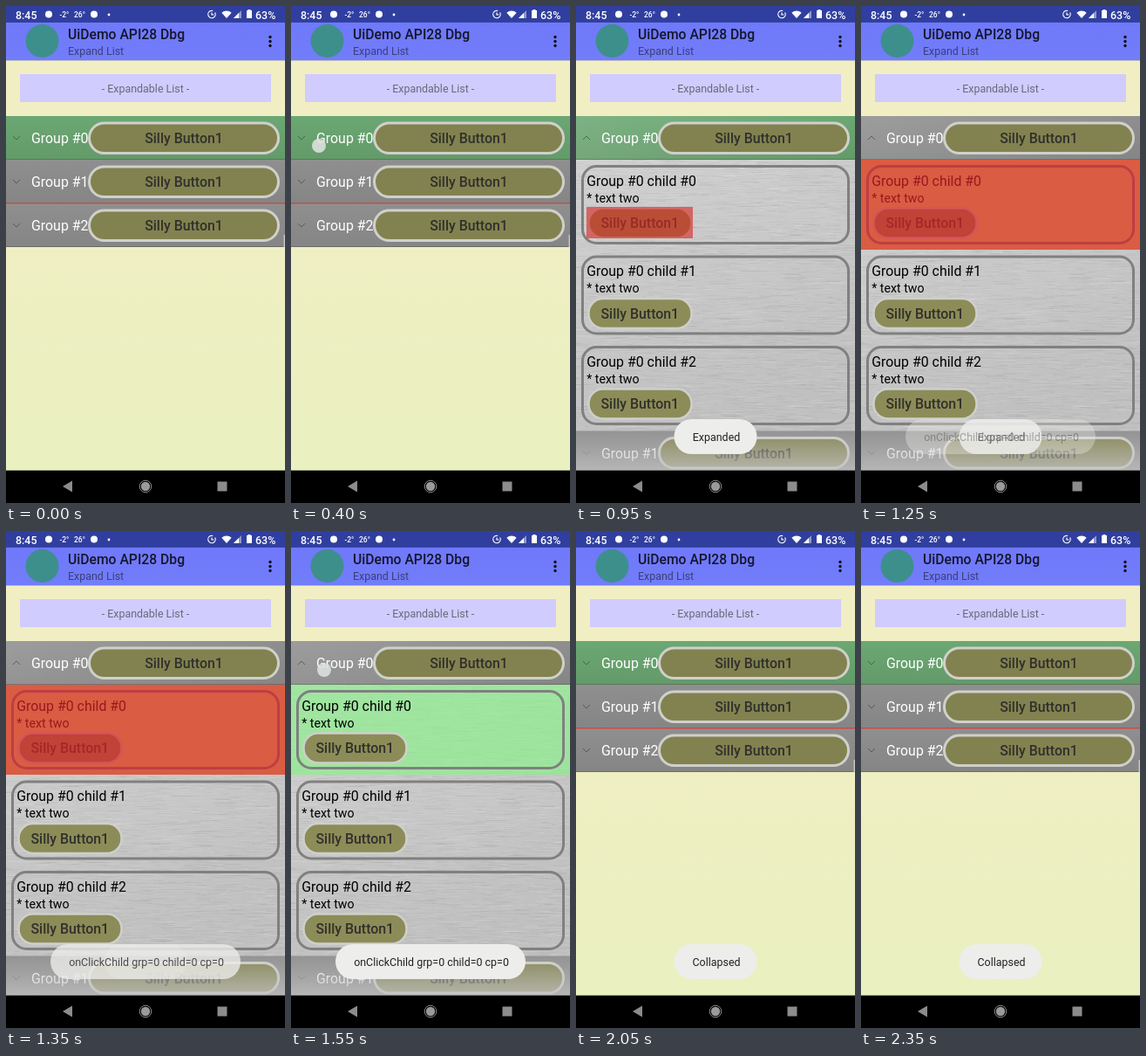
An HTML page with a canvas that plays this animation: 320 by 569 pixels, repeating every 2400 ms.

```html
<!DOCTYPE html>
<html lang="en">
<head>
<meta charset="utf-8">
<title>Expandable list</title>
<style>
html, body { margin: 0; width: 100%; height: 100%; overflow: hidden; background: #000; }
canvas { display: block; width: 320px; height: 569px; }
</style>
</head>
<body>
<canvas id="stage" width="320" height="569"></canvas>
<script>
const ctx = document.getElementById('stage').getContext('2d');
const LOOP = 2400;
const LIST_FONT = 15.9;
const SMALL_FONT = 12.45;

const clamp = v => Math.max(0, Math.min(1, v));
const ramp = (t, from, to) => clamp((t - from) / (to - from));
const pulse = (t, a, b, c, d) => ramp(t, a, b) * (1 - ramp(t, c, d));
const between = (t, a, b) => t >= a && t < b;

function rect(x, y, w, h, fill) {
  ctx.fillStyle = fill;
  ctx.fillRect(x, y, w, h);
}

function shade(x, y, w, h, from, to, sideways = false) {
  const g = ctx.createLinearGradient(x, y, sideways ? x + w : x, sideways ? y : y + h);
  g.addColorStop(0, from);
  g.addColorStop(1, to);
  rect(x, y, w, h, g);
}

function pill(x, y, w, h, r, fill, stroke, line) {
  ctx.beginPath();
  ctx.roundRect(x, y, w, h, r);
  if (fill) { ctx.fillStyle = fill; ctx.fill(); }
  if (stroke) { ctx.strokeStyle = stroke; ctx.lineWidth = line; ctx.stroke(); }
}

function disc(x, y, r, fill) {
  ctx.beginPath();
  ctx.arc(x, y, r, 0, Math.PI * 2);
  ctx.fillStyle = fill;
  ctx.fill();
}

function polygon(fill, ...pts) {
  ctx.beginPath();
  for (let i = 0; i < pts.length; i += 2) ctx.lineTo(pts[i], pts[i + 1]);
  ctx.closePath();
  ctx.fillStyle = fill;
  ctx.fill();
}

function text(str, x, y, size, color, weight = 400, align = 'left') {
  ctx.font = `${weight} ${size}px Roboto, sans-serif`;
  ctx.textAlign = align;
  ctx.fillStyle = color;
  ctx.fillText(str, x, y);
}

// Brushed metal: faint short streaks from a seeded generator
function makeMetal() {
  const tile = document.createElement('canvas');
  tile.width = 320;
  tile.height = 311;
  const c = tile.getContext('2d');
  let seed = 7;
  const random = () => (seed = seed * 16807 % 2147483647) / 2147483647;
  const base = c.createLinearGradient(0, 0, 120, 311);
  base.addColorStop(0, '#d0d0d0');
  base.addColorStop(1, '#c0c0c0');
  c.fillStyle = base;
  c.fillRect(0, 0, 320, 311);
  for (let i = 0; i < 3500; i++) {
    c.fillStyle = random() < 0.5 ? 'rgba(255,255,255,.07)' : 'rgba(90,90,90,.05)';
    c.fillRect(random() * 340 - 20, Math.floor(random() * 311), 4 + random() * 22, 1);
  }
  return tile;
}
const metal = makeMetal();

function statusBar() {
  rect(0, 0, 320, 18.7, '#303f9f');
  text('8:45', 11, 14.5, SMALL_FONT, '#fff', 500);
  disc(49, 9.5, 4, '#fff');
  text('-2°', 61.5, 12.5, 8.5, '#fff', 500);
  text('26°', 78, 12.5, 8.5, '#fff', 500);
  disc(101, 9.5, 4, '#fff');
  disc(118, 10, 1.4, '#fff');
  ctx.strokeStyle = '#fff';
  ctx.lineWidth = 1.2;
  ctx.beginPath();
  ctx.arc(236, 9.5, 4.2, -0.5, 5);
  ctx.moveTo(236, 7.5);
  ctx.lineTo(236, 10);
  ctx.lineTo(238.5, 10);
  ctx.stroke();
  ctx.beginPath();
  ctx.moveTo(253, 14);
  ctx.arc(253, 14, 8.5, -2.3, -0.84);
  ctx.fillStyle = '#fff';
  ctx.fill();
  polygon('#8f98cc', 261, 14, 270, 14, 270, 5);
  polygon('#fff', 261, 14, 267, 14, 267, 8);
  rect(276, 5, 6, 9, '#fff');
  rect(277.5, 4, 3, 1, '#fff');
  text('63%', 286, 14.5, SMALL_FONT, '#fff', 500);
}

function header() {
  rect(0, 62, 320, 1, 'rgba(0,0,0,.12)');
  shade(0, 18.7, 320, 43.5, '#6f79f9', '#727dfb');
  disc(41.5, 40, 19, '#3d8f8c');
  text('UiDemo API28 Dbg', 71, 38, 15.7, '#15162c', 500);
  text('Expand List', 71, 56, SMALL_FONT, '#3b3f77');
  for (const y of [35.5, 40.5, 45.5]) disc(303, y, 1.7, '#111');
}

function navBar() {
  rect(0, 531.7, 320, 38, '#000');
  polygon('#8c8c8c', 65, 550, 76, 543.5, 76, 556.5);
  disc(160, 550, 5.2, '#9a9a9a');
  ctx.beginPath();
  ctx.arc(160, 550, 6.8, 0, Math.PI * 2);
  ctx.strokeStyle = '#8c8c8c';
  ctx.lineWidth = 1;
  ctx.stroke();
  rect(242.5, 544.5, 11, 11, '#8c8c8c');
}

function groupRow(index, y, green, open) {
  if (green) shade(0, y, 320, 50, '#6ba873', '#639a69');
  else shade(0, y, 320, 50, '#8f8f8f', '#858585');
  if (open) shade(0, y, 320, 50, 'rgba(255,255,255,.12)', 'rgba(255,255,255,0)', true);
  rect(0, y + 49, 320, 1, 'rgba(70,70,70,.4)');
  const dir = open ? -1 : 1;
  ctx.beginPath();
  ctx.moveTo(8, y + 25 - 2 * dir);
  ctx.lineTo(12, y + 25 + 2 * dir);
  ctx.lineTo(16, y + 25 - 2 * dir);
  ctx.strokeStyle = 'rgba(50,60,50,.6)';
  ctx.lineWidth = 1;
  ctx.stroke();
  text('Group #' + index, 29, y + 31, LIST_FONT, '#fff');
  pill(95.5, y + 8, 217, 34.5, 17.2, '#828250', '#d0d0cb', 3);
  text('Silly Button1', 204, y + 31, LIST_FONT, '#30302c', 500, 'center');
}

function childRow(index, y) {
  pill(7.5, y + 7.5, 305, 88, 16, null, '#808080', 3);
  text('Group #0 child #' + index, 12.2, y + 29.5, LIST_FONT, '#000');
  text('* text two', 12.2, y + 48.5, 14.2, '#000');
  pill(14.5, y + 55.5, 118, 34, 16.5, '#8c8c58', '#cfcfcb', 2.5);
  text('Silly Button1', 73.3, y + 78, LIST_FONT, '#30302c', 500, 'center');
}

function expandedList(t) {
  const pressed = between(t, 1050, 1400);
  ctx.drawImage(metal, 0, 176);
  if (pressed) rect(0, 176, 320, 103, '#e1e682');
  if (t >= 1400) rect(0, 176, 320, 103, 'rgba(135,243,135,.65)');
  for (let i = 0; i < 3; i++) childRow(i, 176 + i * 103.5);
  if (between(t, 900, 1050)) rect(12, 230, 122, 36, 'rgba(215,40,35,.62)');
  if (pressed) rect(0, 176, 320, 103, 'rgba(215,35,40,.7)');
  groupRow(0, 126, t < 1050, true);
  groupRow(1, 486.5, false, false);
  shade(0, 487, 320, 45, 'rgba(195,195,195,.1)', 'rgba(195,195,195,.8)');
}

function collapsedList() {
  for (let i = 0; i < 3; i++) groupRow(i, 126 + i * 50, i === 0, false);
  rect(0, 225.5, 320, 1, '#f04038');
  rect(318.5, 262, 1.5, 14, '#c4c4c4');
}

function toast(str, width, alpha) {
  if (!alpha) return;
  ctx.globalAlpha = alpha;
  pill(160 - width / 2, 473, width, 40, 20, '#ededeb');
  text(str, 161, 498, SMALL_FONT, '#222', 400, 'center');
  ctx.globalAlpha = 1;
}

function touch(x, y, alpha) {
  ctx.globalAlpha = alpha;
  disc(x, y, 8, 'rgba(222,226,222,.88)');
  ctx.globalAlpha = 1;
}

function draw(t) {
  shade(0, 62, 320, 470, '#f2eec4', '#eaf0c0');
  rect(16, 78, 288, 32, '#d0ccfd');
  text('- Expandable List -', 160, 99, SMALL_FONT, '#69697c', 400, 'center');
  if (between(t, 500, 1700)) expandedList(t);
  else collapsedList();
  touch(32, 160, pulse(t, 300, 350, 450, 500));
  touch(38, 159, pulse(t, 1450, 1500, 1600, 1700));
  toast('Expanded', 95, pulse(t, 550, 750, 1220, 1400));
  toast('onClickChild grp=0 child=0 cp=0', 218, pulse(t, 1170, 1400, 1750, 1900));
  toast('Collapsed', 95, ramp(t, 1780, 1950));
  header();
  statusBar();
  navBar();
}

function frame() {
  const t = performance.now() % LOOP;
  draw(Math.floor(t / 50) * 50);
  requestAnimationFrame(frame);
}
frame();
</script>
</body>
</html>
```
